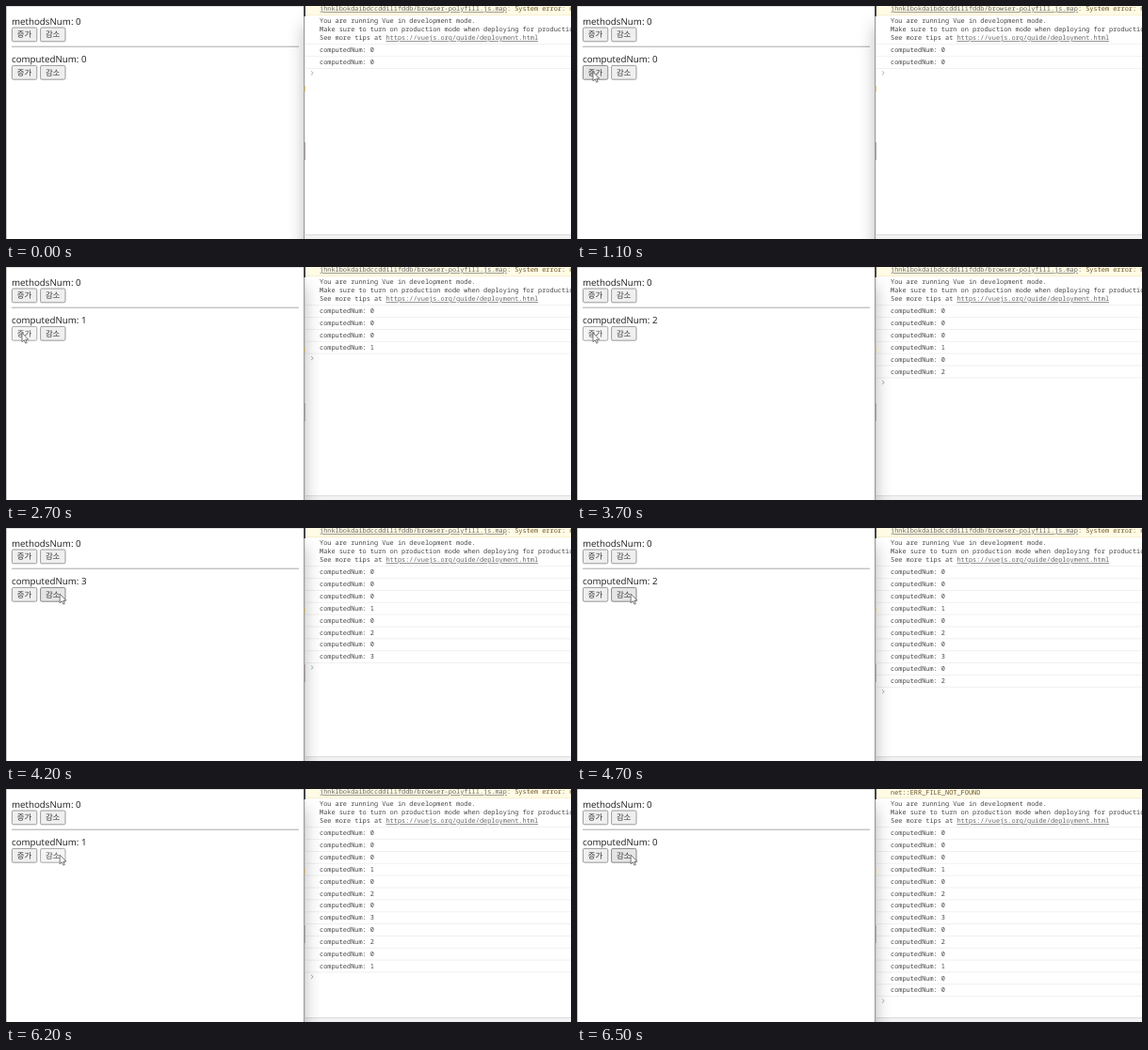
An HTML page for the animation above (7500 ms loop, 600x248 px).

```html
<!DOCTYPE html>
<html lang="ko">
<head>
<meta charset="utf-8">
<title>methods and computed</title>
<style>
  html, body { margin: 0; width: 100%; height: 100%; overflow: hidden; background: #fff; }
  svg { display: block; width: 600px; height: 248px; }
  text { text-rendering: geometricPrecision; }
  .page { font: 9.75px "Open Sans", "Noto Sans", sans-serif; fill: #1c1c1c; }
  .button text { font: 300 8.4px "Noto Sans CJK KR", "Noto Sans CJK", sans-serif; fill: #333; text-anchor: middle; }
  .button rect { fill: #efefef; stroke: #858585; stroke-width: .8; }
  .button.hover rect { fill: #e5e5e5; stroke: #6c6c6c; }
  .button.pressed rect { fill: #f5f5f5; stroke: #959595; }
  .button.pressed text { fill: #444; }
  .console { font: 6.92px "Noto Sans Mono", "DejaVu Sans Mono", monospace; fill: #444; }
  .console .warning { fill: #6a5426; }
  .console .link { fill: #666; text-decoration: underline; text-decoration-thickness: .6px; }
  .divider { stroke: #ececec; stroke-width: .8; }
</style>
</head>
<body>
<svg viewBox="0 0 600 248">
  <defs>
    <filter id="blur" filterUnits="userSpaceOnUse" x="-60" y="-60" width="760" height="460">
      <feGaussianBlur stdDeviation="9"/>
    </filter>
    <clipPath id="leftSide"><rect width="316" height="248"/></clipPath>
    <clipPath id="rightSide"><rect x="317" width="283" height="248"/></clipPath>
  </defs>

  <g class="page">
    <rect width="316" height="1" fill="#e2e2e2"/>
    <rect width=".6" height="248" fill="#999"/>
    <text x="6" y="19.8">methodsNum: 0</text>
    <rect x="6" y="42.7" width="305" height="1" fill="#aaa"/>
    <text x="6" y="60.2">computedNum: <tspan id="value">0</tspan></text>
    <g id="buttons"></g>
  </g>

  <g class="console">
    <rect x="318" width="282" height="9.5" fill="#fffbe5"/>
    <rect x="318" y="9.3" width="282" height=".8" fill="#f5ecc6"/>
    <text class="warning" id="mapWarning" x="333" y="5.4"><tspan class="link">jhnklbokdaibdccddilifddb/browser-polyfill.js.map</tspan>: System error: net::</text>
    <text class="warning" id="netWarning" x="333" y="6">net::ERR_FILE_NOT_FOUND</text>
    <text x="333" y="18.2">You are running Vue in development mode.</text>
    <text x="333" y="27.2">Make sure to turn on production mode when deploying for production.</text>
    <text x="333" y="36.2">See more tips at <tspan class="link">https://vuejs.org/guide/deployment.html</tspan></text>
    <path class="divider" d="M318 40.6H600"/>
    <g id="rows"></g>
    <path id="prompt" d="M324 -2l2.2 2l-2.2 2" fill="none" stroke="#99a5b5" stroke-width=".9"/>
    <rect x="318" y="243.5" width="282" height="4.5" fill="#f1f2f1"/>
    <rect x="318" y="243" width="282" height=".8" fill="#d8d8d8"/>
  </g>

  <!-- The focused window casts its shadow on the other one. -->
  <g id="consoleShadow" clip-path="url(#leftSide)">
    <rect x="317" y="20" width="340" height="340" opacity=".28" filter="url(#blur)"/>
  </g>
  <g id="pageShadow" clip-path="url(#rightSide)">
    <rect x="-24" y="20" width="341" height="340" opacity=".28" filter="url(#blur)"/>
  </g>
  <rect x="316.2" width="1" height="248" fill="#858585"/>
  <rect x="316.2" width="1.8" height="11" fill="#3c3c3c"/>
  <rect x="316.8" y="85" width="1.2" height="6" fill="#d9c478"/>
  <rect x="316.8" y="145" width="1.2" height="19" fill="#aaa39e"/>

  <path id="cursor" d="M0 0V9.6L2.2 7.6L3.7 11L5.2 10.3L3.7 7H6.7Z" fill="#fff" stroke="#444" stroke-width=".7" stroke-linejoin="round"/>
</svg>

<script>
const LOOP = 7500, ROW_HEIGHT = 12.85;
const clicks = [
  { press: 1400, update: 1600, value: 1 },
  { press: 2700, update: 2800, value: 2 },
  { press: 3700, update: 3800, value: 3 },
  { press: 4500, update: 4700, value: 2 },
  { press: 5300, update: 5500, value: 1 },
  { press: 6100, update: 6300, value: 0 },
];
const byId = id => document.getElementById(id);
const show = (element, visible) => element.setAttribute('visibility', visible ? 'visible' : 'hidden');
const mix = (a, b, p) => a + (b - a) * p;

const button = (x, y, label) => `<g class="button">
  <rect x="${x + .4}" y="${y + .4}" width="26.4" height="14.8" rx="1.4"/>
  <text x="${x + 13.4}" y="${y + 10.7}">${label}</text></g>`;
byId('buttons').innerHTML = [22.6, 63]
  .map(y => button(6, y, '증가') + button(36.2, y, '감소')).join('');
const [, , increase, decrease] = byId('buttons').children;

// Every render logs the initial value followed by the current one.
const logs = [0, 0, ...clicks.flatMap(click => [0, click.value])];
byId('rows').innerHTML = logs.map((value, i) => `<g transform="translate(0 ${i * ROW_HEIGHT})">
  <text x="333" y="49.4">computedNum: ${value}</text>
  <path class="divider" d="M318 53.6H600"/></g>`).join('');
const rows = [...byId('rows').children];

function cursorAt(t) {
  const step = Math.floor(t / 100);
  if (step < 9) {
    const left = (1 - (step - 3) / 6) ** 2;
    return [mix(18, 327, left), mix(73, 230, left)];
  }
  if (step < 11) return [18, 73];
  const across = Math.min(1, Math.max(0, (step - 39) / 3));
  return [mix(17, 57.2, across), 70.2];
}

function render(t) {
  const done = clicks.filter(click => t >= click.update);
  const pressed = clicks.some(click => t >= click.press && t < click.update);
  const pageFocused = t >= clicks[0].press;
  const rowCount = 2 + 2 * done.length;

  byId('value').textContent = done.length ? done.at(-1).value : 0;
  rows.forEach((row, i) => show(row, i < rowCount));
  byId('prompt').setAttribute('transform', `translate(0 ${71.4 + (rowCount - 2) * ROW_HEIGHT})`);
  show(byId('mapWarning'), t < 6300);
  show(byId('netWarning'), t >= 6300);
  show(byId('consoleShadow'), !pageFocused);
  show(byId('pageShadow'), pageFocused);

  const [x, y] = cursorAt(t);
  show(byId('cursor'), t >= 300);
  byId('cursor').setAttribute('transform', `translate(${x} ${y})`);
  for (const [target, left] of [[increase, 6], [decrease, 36]]) {
    const hover = t >= 300 && x >= left && x <= left + 27 && y >= 63 && y <= 78;
    target.setAttribute('class', 'button' + (hover ? pressed ? ' pressed' : ' hover' : ''));
  }
}

const start = performance.now();
function frame() {
  render((performance.now() - start) % LOOP);
  requestAnimationFrame(frame);
}
frame();
</script>
</body>
</html>
```
